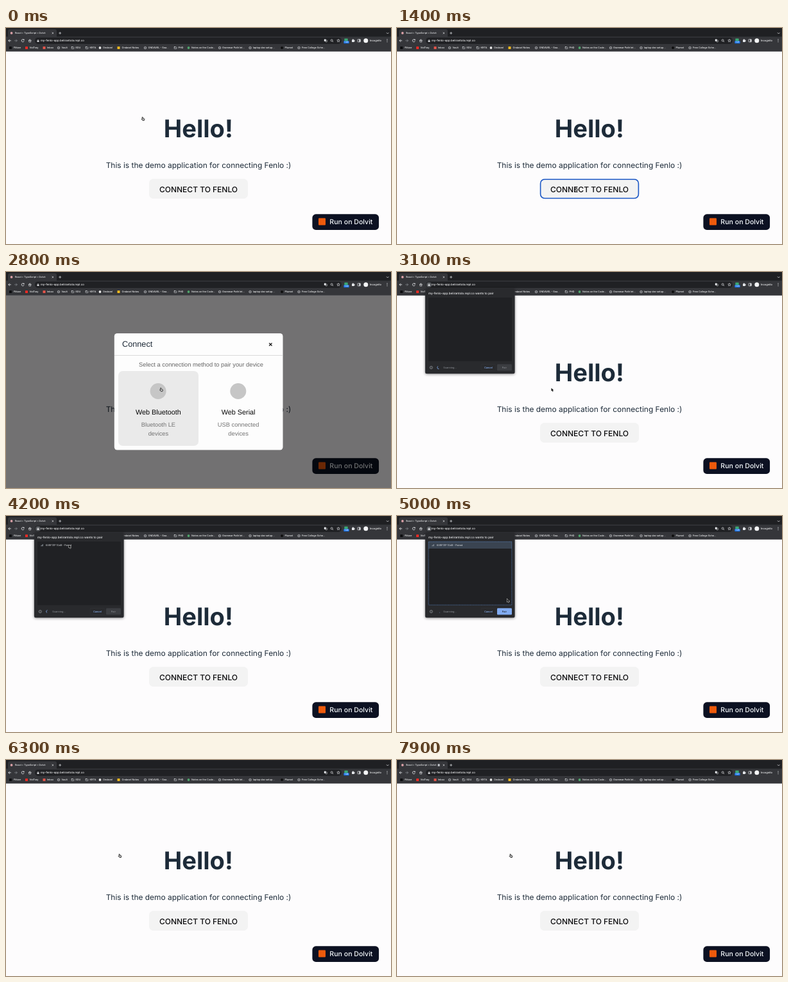
An HTML page with a canvas that plays this animation: 600 px wide and 338 px high, repeating every 8 s.

```html
<!DOCTYPE html>
<html lang="en">
<head>
<meta charset="utf-8">
<title>Connect demo</title>
<style>
html, body { margin: 0; width: 100%; height: 100%; overflow: hidden; background: #fdfcfd; }
canvas { display: block; width: 600px; height: 338px; }
</style>
</head>
<body>
<canvas id="stage"></canvas>
<script>
const W = 600, H = 338, LOOP = 8000, STEP = 100;
const UI = 'Inter, sans-serif';
const HELV = '"Liberation Sans", Arial, sans-serif';
const URL_TEXT = 'my-fenlo-app.belirantola.repl.co';

const canvas = document.getElementById('stage');
const ratio = window.devicePixelRatio || 1;
canvas.width = W * ratio;
canvas.height = H * ratio;
const c = canvas.getContext('2d');
c.textRendering = 'geometricPrecision';

const clamp = v => Math.max(0, Math.min(1, v));
const ease = v => v * v * (3 - 2 * v);
const ramp = (t, a, b) => clamp((t - a) / (b - a));

function rect(x, y, w, h, fill, r = 0) {
  c.fillStyle = fill;
  c.beginPath();
  c.roundRect(x, y, w, h, r);
  c.fill();
}
function frame(x, y, w, h, color, width, r = 0) {
  c.strokeStyle = color;
  c.lineWidth = width;
  c.beginPath();
  c.roundRect(x, y, w, h, r);
  c.stroke();
}
function disc(x, y, r, fill) {
  c.fillStyle = fill;
  c.beginPath();
  c.arc(x, y, r, 0, 7);
  c.fill();
}
function arc(x, y, r, from, to, color, width) {
  c.strokeStyle = color;
  c.lineWidth = width;
  c.beginPath();
  c.arc(x, y, r, from, to);
  c.stroke();
}
function line(points, color, width) {
  c.strokeStyle = color;
  c.lineWidth = width;
  c.beginPath();
  points.forEach(([x, y]) => c.lineTo(x, y));
  c.stroke();
}
function text(s, x, y, size, fill, { font = UI, weight = 400, align = 'left' } = {}) {
  c.font = `${weight} ${size}px ${font}`;
  c.textAlign = align;
  c.fillStyle = fill;
  c.fillText(s, x, y);
}
function cross(x, y, r, color, width) {
  line([[x - r, y - r], [x + r, y + r]], color, width);
  line([[x + r, y - r], [x - r, y + r]], color, width);
}

// label, icon x, text x, icon shape, icon colour
const bookmarks = [
  ['Flitzer', 7, 12, 'square', '#0c0d0f'],
  ['VidTray', 32, 36.5, 'square', '#f02b25'],
  ['Inbox', 59.5, 64, 'square', '#e5554a'],
  ['Vault', 82, 86.5, 'globe'],
  ['EDU', 104, 108.5, 'folder'],
  ['KRTA', 126, 130.5, 'folder'],
  ['Ondavel', 146.5, 151, 'disc', '#e8e8e8'],
  ['Ondavel Notes', 175.5, 180.5, 'square', '#f4b91f'],
  ['ONDAVEL - Sea...', 217, 221.5, 'globe'],
  ['PHD', 264, 268.5, 'folder'],
  ['Notes on the Code...', 284.5, 289, 'disc', '#4fa56b'],
  ['Grammar Path Int...', 333, 337, 'globe'],
  ['laptop dev setup...', 380.5, 385, 'globe'],
  ['Plumet', 430, 434.5, 'disc', '#0c0c0c'],
  ['Free College Sche...', 456.5, 461, 'globe']
];

function drawBookmark([label, ix, tx, shape, color]) {
  const ink = '#d9dbde';
  if (shape === 'folder') {
    rect(ix - 2.2, 29.1, 2, 1, ink, 0.3);
    frame(ix - 1.9, 29.9, 3.8, 2.6, ink, 0.6, 0.4);
  } else if (shape === 'globe') {
    arc(ix, 31, 1.8, 0, 7, ink, 0.6);
    line([[ix - 1.7, 31], [ix + 1.7, 31]], ink, 0.5);
  } else if (shape === 'disc') disc(ix, 31, 1.9, color);
  else rect(ix - 2, 29, 4, 4, color, 0.5);
  text(label, tx, 32.3, 3.8, '#f4f5f6', { weight: 500 });
}

function drawTab(linked) {
  rect(3, 2, 76, 14, '#35363a', [3, 3, 0, 0]);
  disc(8.6, 7.9, 1.9, '#d9a0a6');
  const end = linked ? 61.5 : 66;
  c.save();
  c.beginPath();
  c.rect(14, 2, end - 14, 12);
  c.clip();
  text('React + TypeScript + Dolvit', 14, 9.2, 3.65, '#f1f2f4', { weight: 500 });
  c.restore();
  if (linked) rect(63.6, 6.2, 3, 3.6, '#c9ccd1', 0.3);
  cross(72.8, 8, 1.2, '#e4e6e9', 0.7);
  line([[82.2, 8], [86.2, 8]], '#e4e6e9', 0.7);
  line([[84.2, 6], [84.2, 10]], '#e4e6e9', 0.7);
  line([[593, 7.3], [594.7, 9], [596.4, 7.3]], '#e4e6e9', 0.8);
}

function drawToolbar(t, pairing) {
  const ink = '#e8eaed';
  line([[8, 19.8], [3.8, 19.8]], ink, 0.8);
  line([[5.8, 17.8], [3.8, 19.8], [5.8, 21.8]], ink, 0.8);
  line([[13.2, 19.8], [17.4, 19.8]], '#85888c', 0.8);
  line([[15.4, 17.8], [17.4, 19.8], [15.4, 21.8]], '#85888c', 0.8);
  arc(26.2, 19.8, 2, 0.3, 5.3, ink, 0.8);
  rect(26.9, 17.6, 1.6, 1.6, ink);
  line([[34.9, 20], [37.2, 17.7], [39.5, 20]], ink, 0.8);
  frame(35.8, 19.5, 2.8, 2.4, ink, 0.7);

  rect(45, 14.9, 478, 10, '#202124', 5);
  if (pairing) disc(50, 19.9, 4, '#54575b');
  rect(48.5, 19.4, 3, 2.4, ink, 0.3);
  arc(50, 19.3, 1, Math.PI, 0, ink, 0.5);
  text(URL_TEXT, 54, 21.3, 4.4, '#f6f7f8', { weight: 500 });

  rect(495.8, 17.6, 2.8, 3.2, ink, 0.3);
  frame(498, 19, 2.4, 2.8, ink, 0.5, 0.3);
  arc(507.6, 19.4, 1.5, 0, 7, ink, 0.7);
  line([[508.7, 20.5], [510, 21.8]], ink, 0.8);
  c.lineWidth = 0.6;
  c.beginPath();
  for (let i = 0; i < 10; i++) {
    const a = i * Math.PI / 5 - Math.PI / 2, r = i % 2 ? 1.1 : 2.4;
    c.lineTo(518 + r * Math.cos(a), 19.8 + r * Math.sin(a));
  }
  c.closePath();
  c.stroke();

  rect(527.3, 16.4, 5.4, 5, '#3aa976', 0.6);
  rect(526.3, 20.2, 8.4, 4, '#1a73e8', 0.8);
  text('1:2' + Math.floor(t / 1000), 530.5, 23.4, 3.1, '#fff', { weight: 600, align: 'center' });
  rect(539, 18.3, 3.8, 3.6, ink, 0.4);
  disc(540.8, 18, 0.8, ink);
  disc(543, 20.1, 0.8, ink);
  frame(548, 17.8, 4.2, 4, ink, 0.7, 0.4);
  rect(550.4, 17.8, 1.8, 4, ink);
  disc(560.8, 19.8, 3.5, '#f4f5f6');
  text('Incognito', 566.8, 21.2, 4.1, '#f6f7f8', { weight: 500 });
  [17.9, 19.8, 21.7].forEach(y => disc(594, y, 0.55, ink));
}

function drawBrowser(t, pairing) {
  rect(0, 0, W, 14, '#1f2023');
  rect(0, 13.6, W, 23, '#35363a');
  drawTab(t >= 7400);
  drawToolbar(t, pairing);
  bookmarks.forEach(drawBookmark);
  rect(0, 36, W, 0.7, '#4a4b4f');
}

function drawPage(t) {
  const ink = '#1d2b39';
  rect(0, 36, W, H - 36, '#fdfcfd');
  text('Hello!', 299.8, 170.8, 38.1, ink, { weight: 700, align: 'center' });
  text('This is the demo application for connecting Fenlo :)', 300, 219, 11.95, ink, { align: 'center' });

  rect(223, 236, 154, 31, '#f3f3f3', 6.5);
  if (t >= 1300 && t < 3100) frame(223.6, 236.7, 152.8, 29.8, '#1b57c5', 1.6, 6.5);
  else if (t >= 700 && t < 1300) {
    c.globalAlpha = ramp(t, 700, 1000);
    frame(223.5, 236.5, 153, 30, '#646cff', 0.8, 6.3);
    c.globalAlpha = 1;
  }
  text('CONNECT TO FENLO', 300, 256.5, 12, '#08080a', { weight: 500, align: 'center' });

  rect(477.4, 291.3, 103.7, 24.6, '#0c1122', 5.5);
  rect(487, 297.6, 11, 11, '#ee5a0c', 1);
  text('Run on Dolvit', 504.3, 307.2, 10.6, '#f5f9fc', { weight: 500 });
}

function drawMethod(x, name, note) {
  const mid = { font: HELV, align: 'center' };
  disc(x - 0.3, 186.5, 12.5, '#c6c6c6');
  text(name, x, 223.4, 10.83, '#050505', mid);
  text(note, x, 242, 9.3, '#737373', mid);
  text('devices', x, 256, 9.3, '#737373', mid);
}

function drawModal(t) {
  const shown = ramp(t, 1400, 1600);
  c.globalAlpha = shown;
  rect(0, 36.7, W, H - 36.7, 'rgba(0,0,0,.55)');
  rect(168.8, 96, 262.7, 182.6, '#fdfdfd', 4.5);
  text('Connect', 181, 117.4, 12.7, '#1f2b38', { font: HELV });
  cross(412.3, 113.3, 2.2, '#111', 1.3);
  rect(169, 130.3, 262.5, 0.8, '#cfcfcf');
  text('Select a connection method to pair your device', 304, 148.2, 9.33, '#666', { font: HELV, align: 'center' });
  rect(175, 155, 125, 117, '#eaeaea', 7);
  drawMethod(237.4, 'Web Bluetooth', 'Bluetooth LE');
  drawMethod(362.1, 'Web Serial', 'USB connected');
  c.globalAlpha = 1;
}

function drawPairing(t) {
  const found = t >= 3600, picked = t >= 4300;
  c.save();
  c.shadowColor = 'rgba(0,0,0,.45)';
  c.shadowBlur = 4 * ratio;
  c.shadowOffsetY = ratio;
  rect(44, 25, 139.5, 134, '#292a2d', 2);
  c.restore();
  rect(49, 40, 130, 99.5, '#202124');
  frame(44.2, 25.2, 139.1, 133.6, '#3b3c40', 0.4, 2);
  text(URL_TEXT + ' wants to pair', 49, 35.2, 4.65, '#f1f2f4', { weight: 500 });

  if (picked) {
    rect(49, 40, 130, 11, '#3a4451');
    c.setLineDash([1, 0.7]);
    frame(49.2, 40.2, 129.6, 99, '#5f8fd0', 0.7);
    c.setLineDash([]);
  }
  if (found) {
    [0, 1, 2, 3].forEach(i => rect(54 + i, 46.3 - i * 0.8, 0.7, 0.9 + i * 0.8, '#8d949c'));
    text('KXRF31P 10d8 - Paired', 61.7, 46.9, 3.75, '#e0e3e7');
  }

  arc(53.3, 149.5, 2.1, 0, 7, '#aeb2b7', 0.6);
  text('?', 53.3, 150.7, 3.2, '#aeb2b7', { align: 'center' });
  const turn = (t - 3100) / 1000 * Math.PI * 2;
  const sweep = 0.35 + 2.5 * (0.5 + 0.5 * Math.cos((t - 3100) / 1900 * Math.PI * 3));
  arc(65, 149.5, 2.2, turn + 1.4, turn + 1.4 + sweep, '#8ab4f8', 0.8);
  text('Scanning...', 72.3, 150.8, 3.9, '#92979d');

  frame(131, 144.3, 23, 10.2, '#34373b', 0.5, 1.3);
  text('Cancel', 142.4, 150.8, 3.9, '#8ab4f8', { weight: 500, align: 'center' });
  rect(156, 144.3, 23, 10.2, picked ? '#82acf2' : '#3b3d41', 1.3);
  text('Pair', 167.4, 150.8, 3.9, picked ? '#202124' : '#85888d', { weight: 500, align: 'center' });
}

// time, x, y of the pointer tip
const path = [
  [0, 212, 139.5], [900, 278, 249.5], [1700, 278, 249.5], [2600, 240.5, 181.5],
  [3200, 240.5, 181.5], [4000, 98, 45], [4500, 98, 45], [5000, 171.5, 129.5],
  [5300, 168, 148], [5800, 168, 148], [6200, 176, 147.3], [LOOP, 176, 147.3]
];
function pointerAt(t) {
  const i = path.findIndex(p => p[0] > t);
  const [t0, x0, y0] = path[i - 1], [t1, x1, y1] = path[i];
  const k = ease(ramp(t, t0, t1));
  return [x0 + (x1 - x0) * k, y0 + (y1 - y0) * k];
}

const arrow = new Path2D('M0 0V5l1.2-1 .9 1.9 .9-.4-.9-1.8h1.7z');
const hand = new Path2D('M.3 0Q1.2-.5 1.4.5L1.7 2 3.3 2.3Q4 2.6 3.8 3.6L3.3 5.2H.9L-.8 3.2Q-.8 2.5 .4 3.2L0 .7Q0 .2 .3 0Z');

function drawPointer(t, pairing) {
  c.save();
  c.translate(...pointerAt(t));
  c.lineJoin = 'round';
  if (pairing) {
    c.strokeStyle = '#fff';
    c.lineWidth = 0.9;
    c.stroke(arrow);
    c.fillStyle = '#111';
    c.fill(arrow);
  } else {
    c.fillStyle = '#fff';
    c.fill(hand);
    c.strokeStyle = '#1a1a1a';
    c.lineWidth = 0.9;
    c.stroke(hand);
    line([[1.5, 3], [1.5, 4.2]], '#1a1a1a', 0.5);
    line([[2.5, 3], [2.5, 4.2]], '#1a1a1a', 0.5);
  }
  c.restore();
}

function draw(now) {
  const t = Math.floor((now % LOOP) / STEP) * STEP;
  const pairing = t >= 3100 && t < 5700;
  c.setTransform(ratio, 0, 0, ratio, 0, 0);
  drawPage(t);
  drawBrowser(t, pairing);
  if (t >= 1500 && t < 3100) drawModal(t);
  if (pairing) drawPairing(t);
  drawPointer(t, pairing);
}

const start = performance.now();
function tick() {
  draw(performance.now() - start);
  requestAnimationFrame(tick);
}
tick();
</script>
</body>
</html>
```
